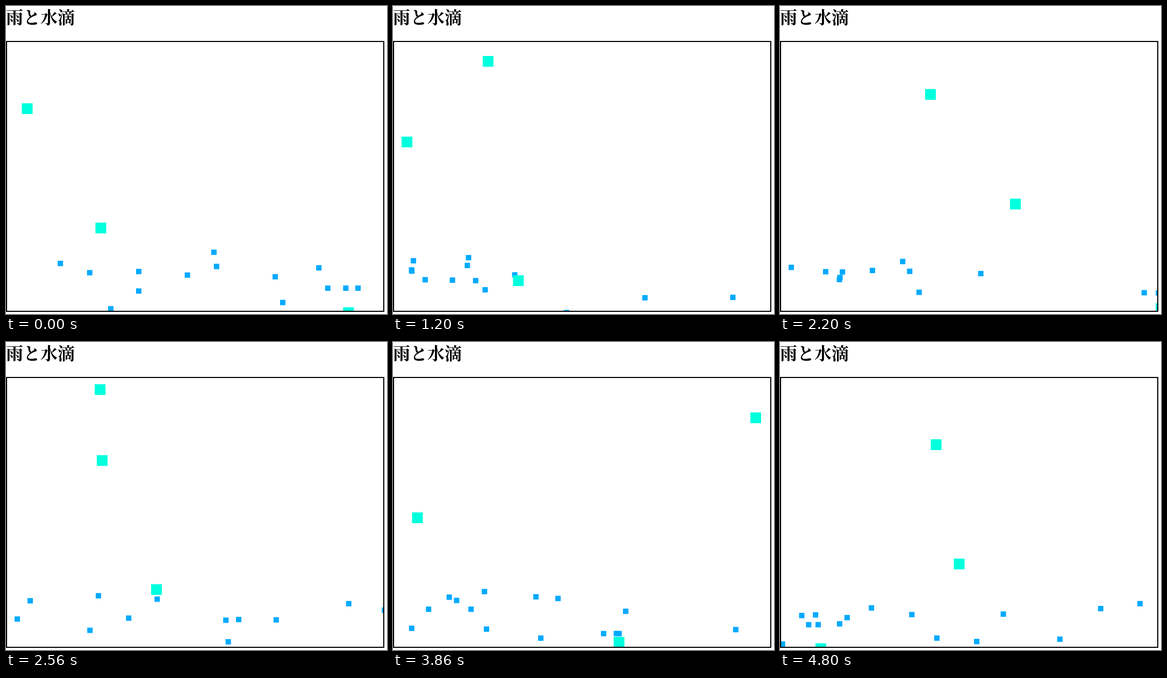
An HTML page with a canvas that plays this animation: 709 by 573 pixels, repeating every 4870 ms.

```html
<!DOCTYPE html>
<html lang="ja">
<head>
<meta charset="utf-8">
<title>雨と水滴</title>
<style>
  html, body { margin: 0; width: 100%; height: 100%; overflow: hidden; background: #fff; }
  h1 {
    position: absolute; left: 0; top: 0; margin: 0; white-space: nowrap;
    font: 600 32px/38px "Noto Serif CJK JP", "Noto Sans CJK JP", "Noto Sans CJK", serif;
  }
  canvas { position: absolute; left: 0; top: 65px; border: 2px solid #000; }
</style>
</head>
<body>
<h1>雨と水滴</h1>
<canvas width="700" height="500"></canvas>
<script>
const ctx = document.querySelector('canvas').getContext('2d');
const LOOP = 4870, PICTURES = 72, TICKS_PER_PICTURE = 102 / 71;
const SPAWN_EVERY = 6, FIRST_SPAWN = -48, HIT = 15, FLOOR = 480;

// Where each raindrop falls, in order of time
const columns = [508, 188, 240, 494, 240, 625.4, 164.5, 27.5, 131.4, 103.6, 221.3, 14, 165,
  697.3, 426, 268, 167, 163.2, 59.2, 408.6, 33.5, 663, 64, 321.4, 278.6];

let seed = 7;
function random(min, max) {
  seed = seed * 16807 % 2147483647;
  return min + (max - min) * seed / 2147483647;
}

// Every drop bursts into three droplets: one to the left, one straight up, one to the right
const drops = columns.map((x, i) => ({
  x,
  spawn: FIRST_SPAWN + i * SPAWN_EVERY,
  droplets: [-1, 0, 1].map(side => ({
    start: x + side * random(0, 50),
    speed: side * 5,
    pull: random(0.25, 0.5)
  }))
}));

// The simulation runs slightly unevenly against the pictures
function tickAt(ms) {
  const picture = Math.min(Math.floor(ms / LOOP * PICTURES + 0.54), PICTURES - 1);
  const wobble = 0.5 * Math.cos((picture + 2) * Math.PI / 10);
  return Math.round(picture * TICKS_PER_PICTURE + wobble);
}

function square(x, y, size, color) {
  ctx.fillStyle = color;
  ctx.fillRect(x, y, size, size);
}

function drawDroplets({ droplets }, age) {
  if (age < 1) return;
  for (const { start, speed, pull } of droplets) {
    square(start + speed * age, FLOOR - 10 * age + pull * age ** 2, 10, '#00aaff');
  }
}

// A drop falls, stops at the floor and sinks away from rest
function drawDrop({ x }, age) {
  if (age < 1) return;
  const y = age < HIT ? 10 * age + 1.5 * age ** 2 : FLOOR + 1.5 * (age - HIT) ** 2;
  square(x, y, 20, '#00ffdd');
}

function draw() {
  const tick = tickAt(performance.now() % LOOP);
  ctx.clearRect(0, 0, 700, 500);
  drops.forEach(drop => drawDroplets(drop, tick - drop.spawn - HIT));
  drops.forEach(drop => drawDrop(drop, tick - drop.spawn));
  requestAnimationFrame(draw);
}
draw();
</script>
</body>
</html>
```
